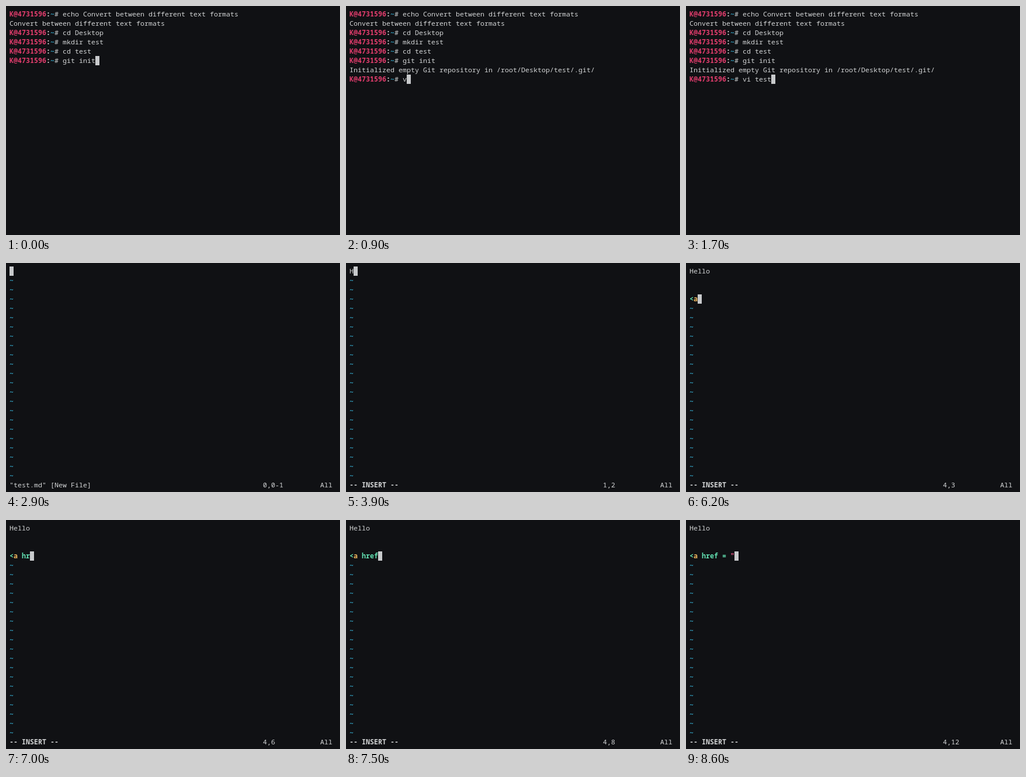
An HTML page with a canvas for the animation above (9 s loop, 572 px wide and 394 px high).

```html
<!DOCTYPE html>
<html lang="en">
<head>
<meta charset="utf-8">
<title>Terminal session</title>
<style>
html, body { margin: 0; width: 100%; height: 100%; overflow: hidden; background: #101114; }
canvas { display: block; width: 572px; height: 394px; }
</style>
</head>
<body>
<canvas id="screen"></canvas>
<script>
const W = 572, H = 394, LOOP = 9000;
const CELL = 7, LINE = 16, PAD = 6, BASE = 12;
const FONT = '11.67px "Noto Sans Mono", "DejaVu Sans Mono", monospace';
const C = {
  bg: '#101114', text: '#d3d5d6', cursor: '#c8cacc', user: '#e23d6d',
  tilde: '#35a9cb', tag: '#63e2b3', name: '#efb75e', quote: '#e0527f'
};
const USER = 'K@4731596';

const canvas = document.getElementById('screen');
const ctx = canvas.getContext('2d');
const scale = window.devicePixelRatio || 1;
canvas.width = W * scale;
canvas.height = H * scale;
ctx.scale(scale, scale);

// Each step: [start time, text typed so far]
const shell = [
  [0, 'git init'], [800, ''], [900, 'v'], [1000, 'vi '], [1400, 'vi te'],
  [1500, 'vi tes'], [1700, 'vi test'], [2400, 'vi test.'], [2800, 'vi test.md']
];
const EDITOR = 2900, INSERT = 3400;
const editor = [
  [EDITOR, ''], [3900, 'H'], [4300, 'He'], [4400, 'Hell'], [4500, 'Hello'],
  [4800, 'Hello\n'], [4900, 'Hello\n\n'], [5200, 'Hello\n\n\n'],
  [5700, 'Hello\n\n\n<'], [6200, 'Hello\n\n\n<a'], [6500, 'Hello\n\n\n<a '],
  [7000, 'Hello\n\n\n<a hr'], [7200, 'Hello\n\n\n<a hre'], [7300, 'Hello\n\n\n<a href'],
  [8000, 'Hello\n\n\n<a href '], [8100, 'Hello\n\n\n<a href ='],
  [8200, 'Hello\n\n\n<a href = '], [8600, 'Hello\n\n\n<a href = "']
];

const stepAt = (steps, t) => steps.filter(s => s[0] <= t).pop()[1];

function put(text, col, row, color = C.text, bold = false) {
  ctx.font = (bold ? 'bold ' : '') + FONT;
  ctx.fillStyle = color;
  [...text].forEach((ch, i) =>
    ctx.fillText(ch, PAD + (col + i) * CELL, PAD + row * LINE + BASE));
}

function cursor(col, row) {
  ctx.fillStyle = C.cursor;
  ctx.fillRect(PAD + col * CELL, PAD + row * LINE, CELL, LINE);
}

function prompt(row, command) {
  put(USER, 0, row, C.user, true);
  put(':', 9, row, C.text, true);
  put('~', 10, row, C.tilde, true);
  put('#', 11, row);
  put(command, 13, row);
}

function drawShell(t) {
  const typed = stepAt(shell, t);
  prompt(0, 'echo Convert between different text formats');
  put('Convert between different text formats', 0, 1);
  prompt(2, 'cd Desktop');
  prompt(3, 'mkdir test');
  prompt(4, 'cd test');
  prompt(5, 'git init');
  let row = 5;
  if (t >= 800) {
    put('Initialized empty Git repository in /root/Desktop/test/.git/', 0, 6);
    row = 7;
    prompt(row, typed);
  }
  cursor(13 + typed.length, row);
}

function drawTag(line, row) {
  if (line.length < 2) return put(line, 0, row);
  [...line].forEach((ch, col) => {
    const color = ch === '"' ? C.quote : col === 1 ? C.name : C.tag;
    put(ch, col, row, color, true);
  });
}

function drawEditor(t) {
  const lines = stepAt(editor, t).split('\n');
  const last = lines.length - 1, col = lines[last].length;
  lines.forEach((line, row) => line[0] === '<' ? drawTag(line, row) : put(line, 0, row));
  for (let row = last + 1; row < 23; row++) put('~', 0, row, C.tilde, true);
  cursor(col, last);

  const inserting = t >= INSERT;
  put(inserting ? '-- INSERT --' : '"test.md" [New File]', 0, 23, C.text, inserting);
  const line = t < 3900 ? 0 : last + 1;
  put(inserting ? `${line},${col + 1}` : '0,0-1', 62, 23);
  put('All', 76, 23);
}

function frame() {
  const t = performance.now() % LOOP;
  ctx.fillStyle = C.bg;
  ctx.fillRect(0, 0, W, H);
  (t < EDITOR ? drawShell : drawEditor)(t);
  requestAnimationFrame(frame);
}
frame();
</script>
</body>
</html>
```
